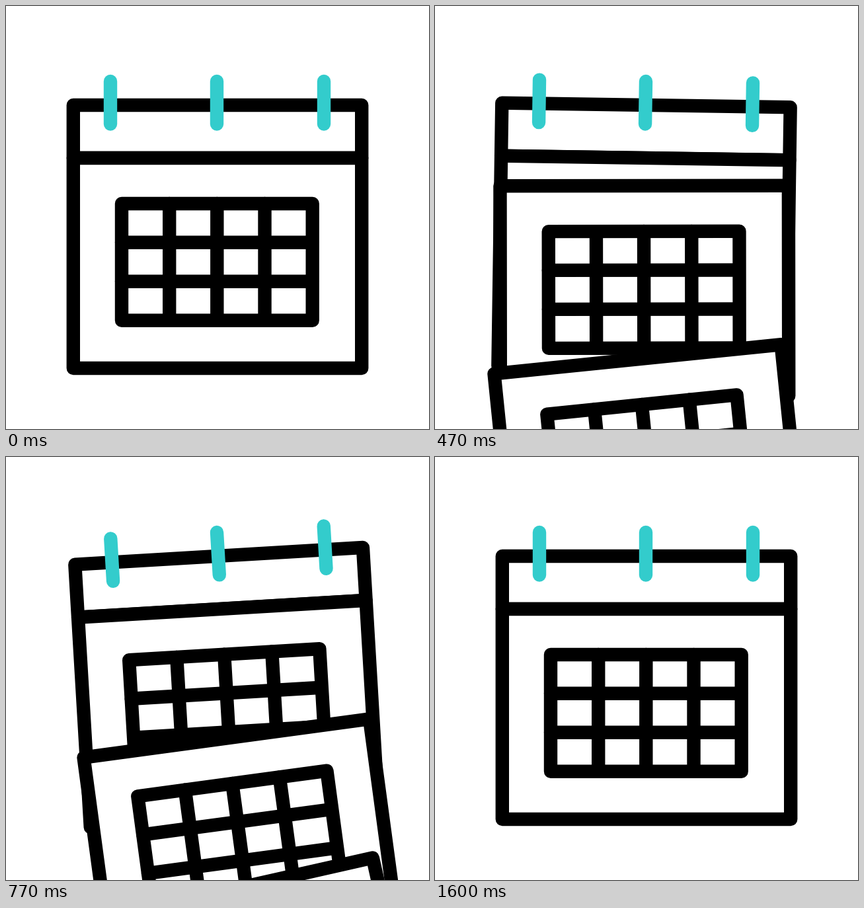
Write an HTML page with a canvas that moves like this. It is 640 px wide and 640 px high and loops after 1.67 s.

```html
<!DOCTYPE html>
<html lang="en">
<head>
<meta charset="utf-8">
<title>Calendar</title>
<style>
  html, body { margin: 0; height: 100%; overflow: hidden; background: #fff; }
  canvas { display: block; width: 100vmin; height: 100vmin; }
</style>
</head>
<body>
<canvas id="stage" width="640" height="640"></canvas>
<script>
const ctx = document.getElementById('stage').getContext('2d');
const LOOP = 1670, FPS = 30, DEG = Math.PI / 180;
const BLACK = '#000', TEAL = '#33cccc';
const PIVOT = { x: 319, y: 114 };

// [step, degrees] of the swinging calendar
const SWING = [[2, 0], [9.3, 10.2], [18.6, -8.2], [19.3, -8.2], [28, 4.2], [34, 0]];
const PAGE_STARTS = [4.6, 11, 15.9], PAGE_STEPS = 18.3, PAGE_DROP = 585;

// Smooth 0..1 progress between two steps
function ease(step, from, to) {
  const s = Math.min(1, Math.max(0, (step - from) / (to - from)));
  return s * s * (3 - 2 * s);
}

function swingAngle(step) {
  let angle = 0;
  for (let i = 1; i < SWING.length; i++) {
    const [from, a] = SWING[i - 1], [to, b] = SWING[i];
    angle += (b - a) * ease(step, from, to);
  }
  return angle * DEG;
}

function line(x1, y1, x2, y2) {
  ctx.beginPath();
  ctx.moveTo(x1, y1);
  ctx.lineTo(x2, y2);
  ctx.stroke();
}

function box(x, y, w, h) {
  ctx.fillRect(x, y, w, h);
  ctx.strokeRect(x, y, w, h);
}

// Origin is the middle of the page's top edge
function page() {
  box(-218.2, 0, 436.4, 318);
  box(-145, 69, 288.7, 176.7);
  for (const x of [-72.8, -0.7, 71.5]) line(x, 69, x, 245);
  for (const y of [127.7, 186.7]) line(-145, y, 143, y);
}

function drawPage(drop) {
  ctx.save();
  ctx.translate(320 - 0.0235 * drop, 230 + drop);
  ctx.rotate(-0.0219 * drop * DEG);
  page();
  ctx.restore();
}

function calendar(step) {
  ctx.save();
  ctx.translate(PIVOT.x, PIVOT.y);
  ctx.rotate(swingAngle(step));
  ctx.translate(-PIVOT.x, -PIVOT.y);
  ctx.strokeStyle = BLACK;
  box(101.8, 150, 436.4, 80);
  drawPage(0);
  for (const start of PAGE_STARTS.slice().reverse()) {
    const fall = ease(step, start, start + PAGE_STEPS);
    if (fall > 0 && fall < 1) drawPage(fall * PAGE_DROP);
  }
  ctx.strokeStyle = TEAL;
  for (const x of [158, 319, 481]) line(x, 114, x, 178.5);
  ctx.restore();
}

function marker(step) {
  const offset = 144 * ease(step, 31, 48) - 90;
  const start = 360 * ease(step, 31.5, 48);
  const end = 360 * ease(step, 26.5, 35);
  if (end <= start) return;
  ctx.strokeStyle = TEAL;
  ctx.beginPath();
  ctx.arc(206.3, 326, 64.5, (offset + start) * DEG, (offset + end) * DEG);
  ctx.stroke();
}

function draw(now) {
  const step = Math.floor((now % LOOP + 4) * FPS / 1000) % 50;
  ctx.fillStyle = '#fff';
  ctx.fillRect(0, 0, 640, 640);
  ctx.lineWidth = 20.4;
  ctx.lineJoin = ctx.lineCap = 'round';
  calendar(step);
  marker(step);
  requestAnimationFrame(draw);
}
requestAnimationFrame(draw);
</script>
</body>
</html>
```
